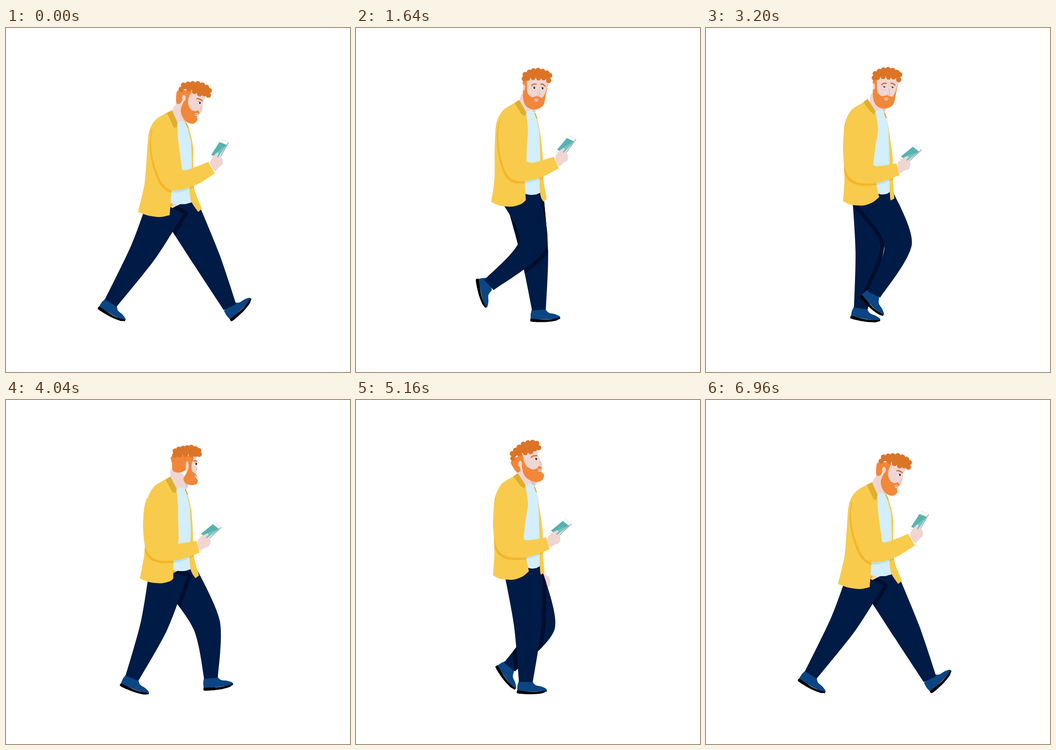
These frames come from a looping animation (748 by 748 pixels, 7000 ms). An HTML page with a canvas:

```html
<!DOCTYPE html>
<html lang="en">
<head>
<meta charset="utf-8">
<title>Walking with a phone</title>
<style>
  html, body { margin: 0; width: 100%; height: 100%; overflow: hidden; background: #fff; }
  canvas { display: block; width: 100vw; height: 100vh; }
</style>
</head>
<body>
<canvas id="stage" width="748" height="748"></canvas>
<script>
const ctx = document.getElementById('stage').getContext('2d');
const LOOP = 7000, TICK = 40, STEP = 696;
const RAD = Math.PI / 180;
const C = {
  yellow: '#f8cb4c', fold: '#f5b529', collar: '#e0ae2f', shirt: '#d3eefc', shirtFold: '#b9e2f6',
  pants: '#001b46', pantsFold: '#000e2c', shoe: '#0b4583', sole: '#000', skin: '#f0d5d1',
  skinFold: '#dfc0c3', hair: '#dc7426', beard: '#f18739', brow: '#cf6a22', dark: '#2b2028'
};

// ---- maths ----
const lerp = (a, b, k) => a + (b - a) * k;
const mix = (A, B, k) => A.map((v, i) => lerp(v, B[i], k));
const ease = (t, from, to) => {
  const k = Math.min(1, Math.max(0, (t - from) / (to - from)));
  return k * k * (3 - 2 * k);
};
const mapXY = (pts, fn) => {
  const out = [];
  for (let i = 0; i < pts.length; i += 2) out.push(...fn(pts[i], pts[i + 1]));
  return out;
};

// Smooth cyclic interpolation of rows [time, ...values] over a period of 2 steps.
function cycle(rows, u) {
  const n = rows.length;
  u = ((u % 2) + 2) % 2;
  let i = n - 1;
  while (rows[i][0] > u) i--;
  const at = j => {
    const turn = Math.floor(j / n), r = rows[j - turn * n];
    return [r[0] + 2 * turn, ...r.slice(1)];
  };
  const [p, a, b, q] = [at(i - 1), at(i), at(i + 1), at(i + 2)];
  const d = b[0] - a[0], k = (u - a[0]) / d, k2 = k * k, k3 = k2 * k;
  return a.slice(1).map((v, j) => {
    const c = j + 1;
    const ma = (b[c] - p[c]) / (b[0] - p[0]) * d, mb = (q[c] - a[c]) / (q[0] - a[0]) * d;
    return (2 * k3 - 3 * k2 + 1) * v + (k3 - 2 * k2 + k) * ma + (3 * k2 - 2 * k3) * b[c] + (k3 - k2) * mb;
  });
}

// ---- drawing helpers ----
function addCurve(path, pts, closed, joined) {
  const n = pts.length / 2;
  const P = i => {
    i = closed ? (i + n) % n : Math.min(n - 1, Math.max(0, i));
    return [pts[2 * i], pts[2 * i + 1]];
  };
  path[joined ? 'lineTo' : 'moveTo'](...P(0));
  for (let i = 0; i < (closed ? n : n - 1); i++) {
    const [p, a, b, q] = [P(i - 1), P(i), P(i + 1), P(i + 2)];
    path.bezierCurveTo(a[0] + (b[0] - p[0]) / 7, a[1] + (b[1] - p[1]) / 7,
      b[0] - (q[0] - a[0]) / 7, b[1] - (q[1] - a[1]) / 7, b[0], b[1]);
  }
}
// Smooth runs joined by sharp corners.
function outline(...runs) {
  const path = new Path2D();
  runs.forEach((r, i) => addCurve(path, r, false, i > 0));
  path.closePath();
  return path;
}
function blob(pts) {
  const path = new Path2D();
  addCurve(path, pts, true);
  return path;
}
function fill(path, color) {
  ctx.fillStyle = color;
  ctx.fill(path);
}
function line(pts, color, width) {
  const path = new Path2D();
  addCurve(path, pts, false);
  ctx.strokeStyle = color;
  ctx.lineWidth = width;
  ctx.lineCap = ctx.lineJoin = 'round';
  ctx.stroke(path);
}
function oval(x, y, rx, ry, color) {
  ctx.beginPath();
  ctx.ellipse(x, y, Math.max(0, rx), Math.max(0, ry), 0, 0, 7);
  ctx.fillStyle = color;
  ctx.fill();
}
function placed(x, y, deg, draw) {
  ctx.save();
  ctx.translate(x, y);
  ctx.rotate(deg * RAD);
  draw();
  ctx.restore();
}
function clipped(path, draw) {
  ctx.save();
  ctx.clip(path);
  draw();
  ctx.restore();
}

// ---- walk: phase, ankle x, y, foot angle, knee x, y ----
const NEAR = [
  [0, 469, 608, -35, 424, 502], [.1, 445, 612, -9, 413, 499], [.333, 389, 614, -2, 384, 490],
  [.805, 274, 605, 22, 322, 490], [1, 228, 598, 30, 299, 486], [1.17, 245, 570, 62, 340, 481],
  [1.356, 289, 559, 77, 384, 470], [1.6, 366, 580, 45, 418, 469], [1.8, 424, 599, 0, 429, 482]
];
const FAR = [
  [0, 487, 607, -43, 436, 502], [.1, 462, 611, -11, 425, 499], [.356, 398, 613, 0, 388, 490],
  [.8, 285, 606, 20, 328, 488], [1, 233, 598, 30, 303, 486], [1.17, 258, 577, 60, 345, 485],
  [1.333, 305, 573, 65, 388, 488], [1.414, 334, 581, 55, 403, 491], [1.805, 446, 605, -6, 436, 488]
];
const BOB = [
  [0, 0], [.2, -13], [.375, -22.5], [.55, -25], [.8, -14], [1, -3],
  [1.2, -11], [1.333, -17], [1.414, -19], [1.55, -20], [1.805, -12]
];

function legPath([ax, ay, , kx, ky], bob) {
  const hx = 361 + (ax - 350) * .1, hy = 385 + bob;
  const side = (x1, y1, x2, y2) => {
    const l = Math.hypot(x2 - x1, y2 - y1);
    return [(y2 - y1) / l, (x1 - x2) / l];
  };
  const th = side(hx, hy, kx, ky), sh = side(kx, ky, ax, ay);
  const kl = Math.hypot(th[0] + sh[0], th[1] + sh[1]);
  const kn = [(th[0] + sh[0]) / kl, (th[1] + sh[1]) / kl];
  const off = (x, y, n, w) => [x + n[0] * w, y + n[1] * w];
  return outline(
    [...off(hx, hy, th, -42), ...off(kx, ky, kn, -30), ...off(ax, ay, sh, -15)],
    [...off(ax, ay, sh, 15), ...off(kx, ky, kn, 30), ...off(hx, hy, th, 42)]);
}
function foot([x, y, deg]) {
  placed(x, y, deg, () => {
    fill(outline([-15, -3, -18, 9, -18, 21], [46, 20, 45, 14, 34, 9, 21, 6, 12, -4]), C.shoe);
    fill(outline([-18, 18, -18, 25, 0, 26.5, 20, 26, 38, 23, 46, 18], [46, 16, 30, 20, 10, 21, -18, 19]), C.sole);
  });
}

// ---- clothes, each as [stride, passing] ----
const BACK = [
  [361, 179, 350, 184, 325, 200, 311, 226, 306, 280, 301, 340, 287, 400],
  [354, 179, 344, 185, 318, 202, 304, 232, 301, 290, 301, 350, 295, 400]];
const HEM = [
  [287, 400, 310, 408, 335, 411, 355, 407],
  [295, 400, 313, 408, 340, 410, 360, 404, 371, 395]];
HEM[0].push(356, 405);
const FRONT_TOP = [[383, 309, 378, 272, 374, 240, 373, 213], [369, 318, 371, 278, 374, 244, 370, 209]];
const PANEL = [
  [[391, 204, 400, 226, 407, 260, 407, 300, 409, 348, 426, 393], [418, 400, 403, 377, 399, 347, 404, 300, 402, 245]],
  [[389, 206, 400, 250, 406, 302, 407, 350, 414, 394], [406, 399, 401, 387, 399, 352, 400, 300, 398, 245]]];
PANEL[1][0].splice(2, 0, 395, 228);
const SHIRT = [
  [[355, 250, 370, 207, 392, 206, 402, 240, 405, 300, 400, 350, 404, 379], [390, 383, 374, 383, 357, 381]],
  [[355, 250, 367, 207, 389, 206, 400, 250, 401, 300, 400, 350, 401, 380], [392, 384, 380, 385, 366, 382]]];
const COLLAR = [[350, 185, 361, 179, 373, 206, 371, 216, 365, 217], [344, 185, 354, 178, 370, 205, 367, 213, 359, 208]];
// near sleeve: [lowered, raised]
const UNDER = [
  [306, 225, 300, 250, 298, 290, 302, 328, 313, 350, 335, 361, 375, 360, 421, 344],
  [320, 215, 315, 250, 322, 295, 338, 335, 357, 352, 385, 351, 420, 338, 454, 316]];
const OVER = [[414, 318, 390, 322, 367, 323, 350, 305, 340, 240], [440, 291, 410, 303, 384, 309, 360, 290, 345, 230]];

function phoneHand(x, y, deg) {
  placed(x, y, deg, () => {
    fill(outline([10, -48], [27, -41], [6, -4], [-14, -9]), '#aeb4b8');
    fill(outline([9, -48], [25, -42], [4, -5], [-15, -10]), '#fff');
    fill(outline([6, -42], [22, -36], [3, -8], [-12, -14]), '#56b3b0');
    fill(outline([22, -36], [3, -8], [-8, -13]), '#78c3bf');
    line([10, -48, 26, -42], '#d5d9db', .8);
    fill(blob([-14, 4, -10, -7, -5, -13, 1, -19, 4, -17, 1, -9, 8, -11, 13, -4, 13, 6, 6, 12, -4, 21]), C.skin);
  });
}
function farArm(swing, bob) {
  const x = 396 + 32 * swing, y = 400 - 10 * swing * swing + bob;
  placed(x, y, 65 - 60 * swing, () =>
    fill(blob([-8, -6, 4, -6, 13, -8, 25, -2, 29, 5, 24, 9, 15, 6, 6, 7, -8, 6]), C.skin));
  line([382, 240 + bob, 372 + 10 * swing, 330 + bob, x - 9, y - 8], C.fold, 16);
}

// ---- head poses ----
const SIDE = {
  neck: [378, 158, 363, 176, 362, 186, 373, 209, 390, 209, 393, 190],
  hair: [381, 133, 386, 124, 396, 122, 406, 121, 417, 121, 427, 124, 436, 129, 442, 136, 440, 146, 431, 143, 421, 143, 410, 138, 398, 133],
  nape: [374, 136, 400, 137, 398, 148, 390, 152, 384, 157, 379, 164, 371, 164, 370, 150],
  face: [399, 137, 433, 147, 430, 158, 428, 168, 426, 181, 422, 184, 419, 185, 417, 192, 405, 195, 395, 175],
  beard: [403, 138, 397, 152, 396, 165, 402, 177, 411, 181, 417, 179, 421, 185, 415, 192, 416, 201, 407, 208, 394, 205, 384, 193, 380, 178, 387, 157, 394, 140],
  ear: [387, 152], eye: [421, 163], eye2: [428, 163], mouth: [414, 188],
  brow: [415, 154, 420, 154, 427, 158], brow2: [427, 158, 427, 158, 427, 158],
  nose: [425, 172, 422, 178, 421, 183], size: [4, 7, 0, 4]
};
const FRONT = {
  neck: [363, 143, 356, 158, 361, 180, 372, 187, 388, 187, 391, 165],
  hair: [366, 110, 368, 101, 377, 96, 386, 93, 396, 92, 406, 94, 415, 98, 421, 103, 419, 114, 408, 108, 397, 108, 385, 107, 373, 109],
  nape: [363, 116, 371, 113, 371, 125, 369, 135, 368, 140, 367, 145, 365, 145, 363, 125],
  face: [370, 112, 417, 115, 416, 130, 413, 145, 408, 155, 400, 160, 385, 160, 373, 150, 369, 135, 368, 120],
  beard: [371, 117, 372, 132, 374, 143, 383, 150, 394, 148, 405, 151, 412, 140, 417, 122, 411, 155, 407, 168, 395, 176, 380, 176, 368, 167, 363, 150, 364, 124],
  ear: [365, 129], eye: [387, 130], eye2: [405, 131], mouth: [392, 156],
  brow: [382, 125, 386, 122, 392, 122], brow2: [402, 122, 406, 122, 411, 126],
  nose: [398, 134, 399, 146, 393, 147], size: [2.5, 7, 1, 5]
};
const AWAY = {
  neck: [361, 148, 358, 168, 364, 184, 374, 197, 394, 193, 394, 170],
  hair: [367, 120, 368, 111, 376, 107, 385, 105, 394, 104, 403, 103, 412, 106, 419, 110, 420, 118, 412, 118, 403, 119, 390, 118, 378, 119],
  nape: [361, 122, 405, 122, 404, 138, 398, 145, 388, 154, 376, 158, 363, 154, 361, 138],
  face: [404, 122, 414, 124, 413, 132, 415, 140, 416, 150, 414, 157, 413, 163, 408, 166, 404, 160, 404, 140],
  beard: [407, 124, 404, 138, 404, 152, 408, 158, 411, 160, 413, 161, 414, 164, 413, 168, 417, 175, 414, 183, 402, 185, 391, 181, 386, 172, 394, 155, 398, 135],
  ear: [394, 143], eye: [413, 139], eye2: [414, 139], mouth: [413, 165],
  brow: [408, 133, 411, 132, 415, 133], brow2: [415, 133, 415, 133, 415, 133],
  nose: [415, 149, 415, 151, 414, 153], size: [3.5, 10, 0, 2.5]
};
const remap = (pose, fn) => Object.fromEntries(
  Object.entries(pose).map(([k, v]) => [k, k === 'size' ? v : mapXY(v, fn)]));
const lower = (pose, dy) => remap(pose, (x, y) => [x, y + dy]);
const cs = Math.cos(-35 * RAD), sn = Math.sin(-35 * RAD);
const UP = remap(SIDE, (x, y) => [
  357 + (x - 387) * cs - (y - 152) * sn, 158 + (x - 387) * sn + (y - 152) * cs]);
UP.neck = [354, 168, 354, 183, 359, 200, 369, 210, 386, 210, 393, 190];
const HEADS = [SIDE, lower(FRONT, 22), lower(AWAY, 12), UP, SIDE];

function headAt(t, bob) {
  const h = ease(t, 1250, 1600) + ease(t, 3500, 4000) + ease(t, 4200, 4950) + ease(t, 6350, 6900);
  const i = Math.min(3, Math.floor(h));
  const pose = {};
  for (const k in SIDE) pose[k] = mix(HEADS[i][k], HEADS[i + 1][k], h - i);
  return lower(pose, bob);
}
function neck(p) {
  fill(blob(p.neck), C.skin);
  const n = p.neck;
  fill(outline([n[10], n[11]], [n[8], n[9]], [n[8] - 10, n[9] - 23]), C.skinFold);
}
function eye([x, y], scale, lid) {
  oval(x - .5, y, 3.6 * scale, 2.4 * scale * lid, '#fff');
  oval(x + .6, y, 1.9 * scale, 2.2 * scale * lid, C.dark);
  if (scale > .5) line([x - 3.5, y - 2 * lid, x, y - 2.6 * lid, x + 3, y - 1.6 * lid], '#8c6460', .8);
}
function head(p, lid) {
  const [earW, earH, second, lip] = p.size;
  fill(blob(p.face), C.skin);
  fill(blob(p.nape), C.beard);
  fill(blob(p.beard), C.beard);
  oval(...p.ear, earW, earH, C.skin);
  line(p.nose, C.skinFold, 1.8);
  eye(p.eye, 1, lid);
  eye(p.eye2, second, lid);
  line(p.brow, C.brow, 2.4);
  if (second > .1) line(p.brow2, C.brow, 2.4 * second);
  const [mx, my] = p.mouth;
  oval(mx, my, lip, 3.2, '#efc9c5');
  line([mx - lip * .7, my + .6, mx, my - .7, mx + lip * .7, my + .4], '#a9675f', 1);
  const hair = blob(p.hair);
  for (let i = 0; i < p.hair.length; i += 2) {
    hair.moveTo(p.hair[i], p.hair[i + 1]);
    hair.arc(p.hair[i], p.hair[i + 1], 5.6, 0, 7);
  }
  ctx.fillStyle = C.hair;
  ctx.fill(hair, 'nonzero');
  for (let i = 0; i < p.hair.length; i += 2) oval(p.hair[i], p.hair[i + 1], 5.6, 5.6, C.hair);
}

// ---- whole figure ----
function render(t) {
  const s = t / STEP;
  const near = cycle(NEAR, s + 1), far = cycle(FAR, s), [bob] = cycle(BOB, s);
  const stride = (Math.abs(near[0] - far[0]) / 259 - .35) / .65;
  const raise = 1 - ease(t, 1300, 2100) + ease(t, 5600, 6700);
  const lid = 1 - .35 * (ease(t, 1900, 2250) - ease(t, 3300, 3600));
  const cloth = ([a, b]) => mapXY(mix(b, a, stride), (x, y) => [x, y + bob]);
  const sleeve = ([a, b]) => mapXY(mix(a, b, raise), (x, y) => [x, y + bob]);
  const pair = ([a, b]) => outline(cloth([a[0], b[0]]), cloth([a[1], b[1]]));

  ctx.fillStyle = '#fff';
  ctx.fillRect(0, 0, 748, 748);

  farArm(Math.cos((s - 1) * Math.PI), bob);

  const farLeg = legPath(far, bob), nearLeg = legPath(near, bob);
  foot(far);
  fill(farLeg, C.pants);
  clipped(farLeg, () => {
    ctx.strokeStyle = C.pantsFold;
    ctx.lineWidth = 17;
    ctx.stroke(nearLeg);
  });
  foot(near);
  fill(nearLeg, C.pants);

  const pose = headAt(t, bob);
  const shirt = pair(SHIRT), panel = pair(PANEL);
  const hem = cloth([HEM[0], HEM[1]]);
  const jacket = outline(cloth(BACK), hem, cloth([[360, 350], [368, 362]]), cloth(FRONT_TOP));
  const arm = outline(sleeve(UNDER), sleeve(OVER));
  const shade = color => {
    ctx.save();
    ctx.translate(-3, 5);
    fill(arm, color);
    ctx.restore();
  };
  neck(pose);
  fill(shirt, C.shirt);
  clipped(shirt, () => shade(C.shirtFold));
  fill(panel, C.yellow);
  clipped(panel, () => shade(C.fold));
  fill(jacket, C.yellow);
  clipped(jacket, () => shade(C.fold));
  const c = cloth(COLLAR);
  fill(outline(c.slice(0, 4), c.slice(4, 6), c.slice(6)), C.collar);
  line(cloth([[391, 206, 396, 216], [389, 208, 393, 218]]), C.collar, 2.5);

  phoneHand(lerp(431, 458, raise), lerp(320, 290, raise) + bob, 18 * (1 - raise));
  fill(arm, C.yellow);
  head(pose, lid);
}

const start = performance.now();
function frame() {
  const t = (performance.now() - start) % LOOP;
  render(Math.floor(t / TICK) * TICK);
  requestAnimationFrame(frame);
}
frame();
</script>
</body>
</html>
```
